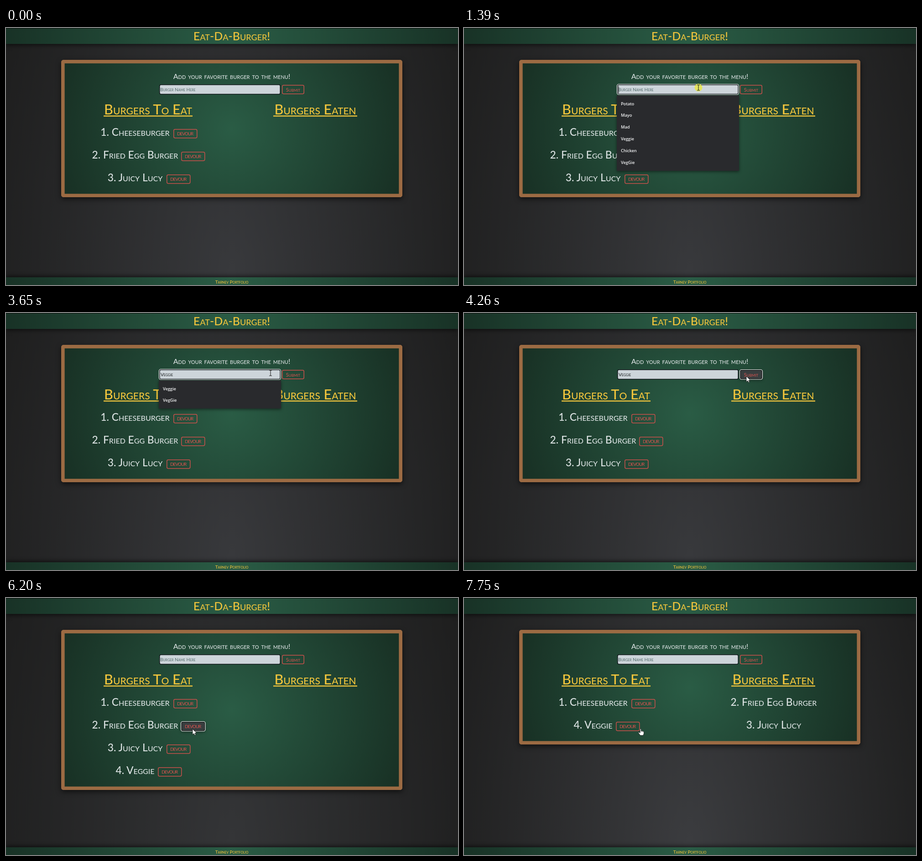
Animation, 991 px wide and 565 px high, one loop 8000 ms. Source, as an HTML page:

```html
<!DOCTYPE html>
<html lang="en">
<head>
<meta charset="utf-8">
<title>Burger menu</title>
<style>
  html, body { margin: 0; width: 100%; height: 100%; overflow: hidden; background: #1e1e1e; }
  #stage { position: absolute; left: 0; top: 0; width: 991px; height: 565px; overflow: hidden;
    background: radial-gradient(ellipse 560px 1100px at 495px 540px, var(--glow), #1e1e1e); }
  .bar { position: absolute; left: 0; width: 991px; background: radial-gradient(circle, #2a5c45, #183226); }
  #top { top: 0; height: 35px; box-sizing: border-box; border-top: 1px solid #0a0f0c; box-shadow: 0 3px 9px rgba(0,0,0,.55); }
  #foot { top: 548px; height: 17px; box-shadow: 0 -3px 9px rgba(0,0,0,.55); }
  #board { position: absolute; left: 121px; top: 70px; width: 748px; box-sizing: border-box;
    border: 7px solid #9c6b43; border-radius: 5px; box-shadow: 0 4px 12px rgba(0,0,0,.6);
    background: radial-gradient(circle, #2a5c45, #183024) padding-box; }
  svg { position: absolute; left: 0; top: 0; }
  text { font-family: Lato, "Open Sans", sans-serif; white-space: pre; }
  .sc { font-variant: small-caps; }
  .gold { fill: #f0c43c; font-weight: 500; }
  .chalk { fill: #dbe2e2; font-weight: 500; }
  .red { fill: #d9534f; }
  .menu { font: 600 9.3px "Open Sans", "Noto Sans", sans-serif; letter-spacing: -.1px; fill: #f4f5f6; }
  .lift { filter: drop-shadow(0 2px 3px rgba(0,0,0,.5)); }
</style>
</head>
<body>
<div id="stage">
  <div id="top" class="bar"></div>
  <div id="board"></div>
  <div id="foot" class="bar"></div>
  <svg id="fixed" width="991" height="565"></svg>
  <svg id="live" width="991" height="565"></svg>
</div>
<script>
const LOOP = 8000;
const $ = id => document.getElementById(id);

// event times in ms
const FOCUS = 1230, DROP = 1390, NARROW = 2180, FILTER = 2250, SUBMIT = 4110;
const ADDED = 4420, EAT_2 = 6130, GONE_2 = 6280, EAT_3 = 7370, GONE_3 = 7670;
const KEYS = [2180, 2410, 2560, 2640, 2870, 3100];
const CARETS = [338.5, 345.5, 349.5, 354.5, 359.5, 361.5, 365.5];

// burger name and the left edge of its button
const ITEMS = {
  1: ['Cheeseburger', 367], 2: ['Fried Egg Burger', 384],
  3: ['Juicy Lucy', 352], 4: ['Veggie', 333]
};
const PAGES = [
  { from: 0, eat: [1, 2, 3], eaten: [], height: 302, glow: '#38393c' },
  { from: ADDED, eat: [1, 2, 3, 4], eaten: [], height: 352, glow: '#343537' },
  { from: GONE_2, eat: [1, 3, 4], eaten: [2], height: 302, glow: '#38393c' },
  { from: GONE_3, eat: [1, 4], eaten: [2, 3], height: 252, glow: '#3b3c3f' }
];

// pointer moves: start, end, steps, x, y
const MOVES = [
  [390, 1080, 10, 514, 131], [1710, 1780, 2, 570, 130], [3650, 3960, 5, 619, 139],
  [4890, 5120, 4, 611, 144], [5200, 5650, 7, 432, 256], [5730, 5960, 4, 409, 288],
  [6890, 7200, 5, 387, 287]
];

const within = (t, a, b) => t >= a && t < b;
const rowY = i => Math.round(222 + i * 50.1);
const text = (s, x, y, size, cls, extra = '') =>
  `<text x="${x}" y="${y}" font-size="${size}" class="${cls}" ${extra}>${s}</text>`;
const mid = (s, x, y, size, cls, extra = '') => text(s, x, y, size, cls, 'text-anchor="middle" ' + extra);
const rect = (x, y, w, h, fill, extra = '') =>
  `<rect x="${x}" y="${y}" width="${w}" height="${h}" fill="${fill}" ${extra}/>`;

function pointer(t) {
  let x = 706, y = 232;
  for (const [a, b, n, toX, toY] of MOVES) {
    if (t < a) break;
    const p = Math.min(1, (Math.floor((t - a) / (b - a) * (n - 1) + 1e-6) + 1) / n);
    x += (toX - x) * p;
    y += (toY - y) * p;
  }
  return { x: Math.round(x), y: Math.round(y), shown: t >= 390 };
}

const inBox = (p, x, y, w, h) => p.shown && p.x >= x && p.x <= x + w && p.y >= y && p.y <= y + h;

function button(x, y, w, h, label, focused, hover) {
  const fill = focused || hover ? '#383e3f' : 'none';
  let out = rect(x + .75, y + .75, w - 1.5, h - 1.5, fill,
    `rx="3" stroke="${focused ? '#191c1c' : '#c9504b'}" stroke-width="1.5" ${fill === 'none' ? '' : 'class="lift"'}`);
  if (focused) out += rect(x - .5, y - .5, w + 1, h + 1, 'none', 'rx="4" stroke="#f2f2f2" stroke-width="1.2"');
  return out + label;
}

function field(t) {
  const focused = within(t, FOCUS, SUBMIT);
  const typed = t < ADDED ? KEYS.filter(k => t >= k).length : 0;
  let out = rect(336.75, 124.75, 264.5, 20.75, '#cdd5da', 'rx="3" stroke="#10171a" stroke-width="1.5"');
  if (focused) out += rect(335.5, 123.5, 267, 23, 'none', 'rx="4" stroke="#f4f4f4" stroke-width="1.2"');
  out += typed ? text('Veggie'.slice(0, typed), 339, 139, 10, 'sc', 'fill="#15191b"')
               : text('Burger Name Here', 338, 139, 10, 'sc', 'fill="#4f6868"');
  const blink = within(t, 1950, NARROW) || within(t, 3650, SUBMIT);
  if (focused && !blink) out += rect(CARETS[typed], 128, 1, 15, '#111');
  return out;
}

function dropdown(t) {
  if (!within(t, DROP, SUBMIT)) return '';
  const names = t < FILTER ? ['Potato', 'Mayo', 'Mad', 'Veggie', 'Chicken', 'VegGie'] : ['Veggie', 'VegGie'];
  const bottom = t < NARROW ? 314 : t < FILTER ? 214.5 : 210;
  return rect(335, 148, 268, bottom - 148, '#292a2d', 'class="lift"') +
    `<clipPath id="cut">${rect(335, 148, 268, bottom - 148, '#fff')}</clipPath><g clip-path="url(#cut)">` +
    names.map((s, i) => `<text class="menu" x="344" y="${169.5 + i * 25.8}">${s}</text>`).join('') + '</g>';
}

function lists(t, page, p) {
  const name = (id, i, x) => mid(`${id}. ${ITEMS[id][0]}`, x, rowY(i) + 15, 22.8, 'sc chalk');
  const active = within(t, EAT_2, GONE_2) ? 2 : within(t, EAT_3, GONE_3) ? 3 : 0;
  return page.eat.map((id, i) => {
    const x = ITEMS[id][1], y = rowY(i);
    const label = mid('DEVOUR', x + 25.6, y + 14, 10, 'red', 'letter-spacing="-1.1"');
    return name(id, i, 283) + button(x, y, 52.5, 20.5, label, id === active, inBox(p, x, y, 52, 20));
  }).join('') + page.eaten.map((id, i) => name(id, i, 679)).join('');
}

function popup(t) {
  if (!within(t, 4500, 5810)) return '';
  return `<g class="lift">${rect(566, -4, 211, 46.5, '#35363a', 'rx="2"')}</g>` +
    rect(566, 0, 211, 9, '#292a2d') + rect(577, 1, 115, 1.6, '#3d4654') + rect(577, 1, 57, 1.8, '#8ab4f8') +
    text('Wendle Translate', 577, 29, 9, '', 'fill="#6c6f74"');
}

const SHAPES = {
  arrow: '<path d="M0 0V12.5L3 9.8L5 14L7 13L5.1 9H9Z" fill="#fff" stroke="#111" stroke-width=".8"/>',
  beam: '<path d="M-3-6H-1L0-5L1-6H3M0-5V5M-3 6H-1L0 5L1 6H3" fill="none" stroke="#222" stroke-width="1.1"/>',
  hand: '<path d="M-1 1Q0-.6 1.2 1V5.5Q2.4 4.2 3.6 5.8Q4.8 4.7 5.8 6.3Q7.2 5.6 7.4 7.4V11L6 15H-.5L-4.5 9.5Q-4.8 7.3-2.6 8.2L-1 10Z"' +
    ' fill="#fff" stroke="#111" stroke-width=".8"/><path d="M1.2 5.5V8M3.6 6V8M5.8 6.5V8.3" stroke="#333" stroke-width=".6"/>'
};

function cursor(t, p, page) {
  if (!p.shown) return '';
  const waiting = within(t, 4260, 4890) || within(t, 6200, 6890);
  const overButton = inBox(p, 605, 125, 49, 20) ||
    page.eat.some((id, i) => inBox(p, ITEMS[id][1], rowY(i), 52, 20));
  const shape = waiting ? 'arrow' : overButton || t >= GONE_3 ? 'hand'
    : inBox(p, 336, 124, 266, 22) ? 'beam' : 'arrow';
  const ring = within(t, 1310, 1540) ? '<circle r="8.5" fill="#e6e64a" fill-opacity=".85"/>' : '';
  return `<g transform="translate(${p.x} ${p.y})">${ring}${SHAPES[shape]}</g>`;
}

$('fixed').innerHTML =
  mid('Eat-Da-Burger!', 495, 27, 25, 'sc gold') +
  mid('Add your favorite burger to the menu!', 495, 111.5, 15.8, 'sc chalk', 'word-spacing="1"') +
  mid('Burgers To Eat', 311.5, 190, 30.5, 'sc gold') + rect(214, 192.3, 195, 2.4, '#f0c43c') +
  mid('Burgers Eaten', 678, 190, 30.5, 'sc gold') + rect(586, 192.3, 184, 2.4, '#f0c43c') +
  mid('Tarnev Portfolio', 495, 561.5, 10, 'sc gold');

let last = '';
function render(t) {
  const page = PAGES.filter(s => t >= s.from).pop();
  const p = pointer(t);
  const submit = mid('Submit', 629.5, 139.5, 11, 'sc red');
  const frame = rect(124.9, 74.1, 740.2, page.height - 7.9, 'none', 'rx="1.5" stroke="#9c6b43" stroke-width="7.4"');
  const picture = frame + field(t) +
    button(605, 125, 49, 20.5, submit, within(t, SUBMIT, ADDED), inBox(p, 605, 125, 49, 20)) +
    lists(t, page, p) + dropdown(t) + popup(t) + cursor(t, p, page);
  if (picture === last) return;
  last = picture;
  $('live').innerHTML = picture;
  $('board').style.height = page.height + 'px';
  $('stage').style.setProperty('--glow', page.glow);
}

const start = performance.now();
function tick() {
  render((performance.now() - start) % LOOP);
  requestAnimationFrame(tick);
}
tick();
</script>
</body>
</html>
```
